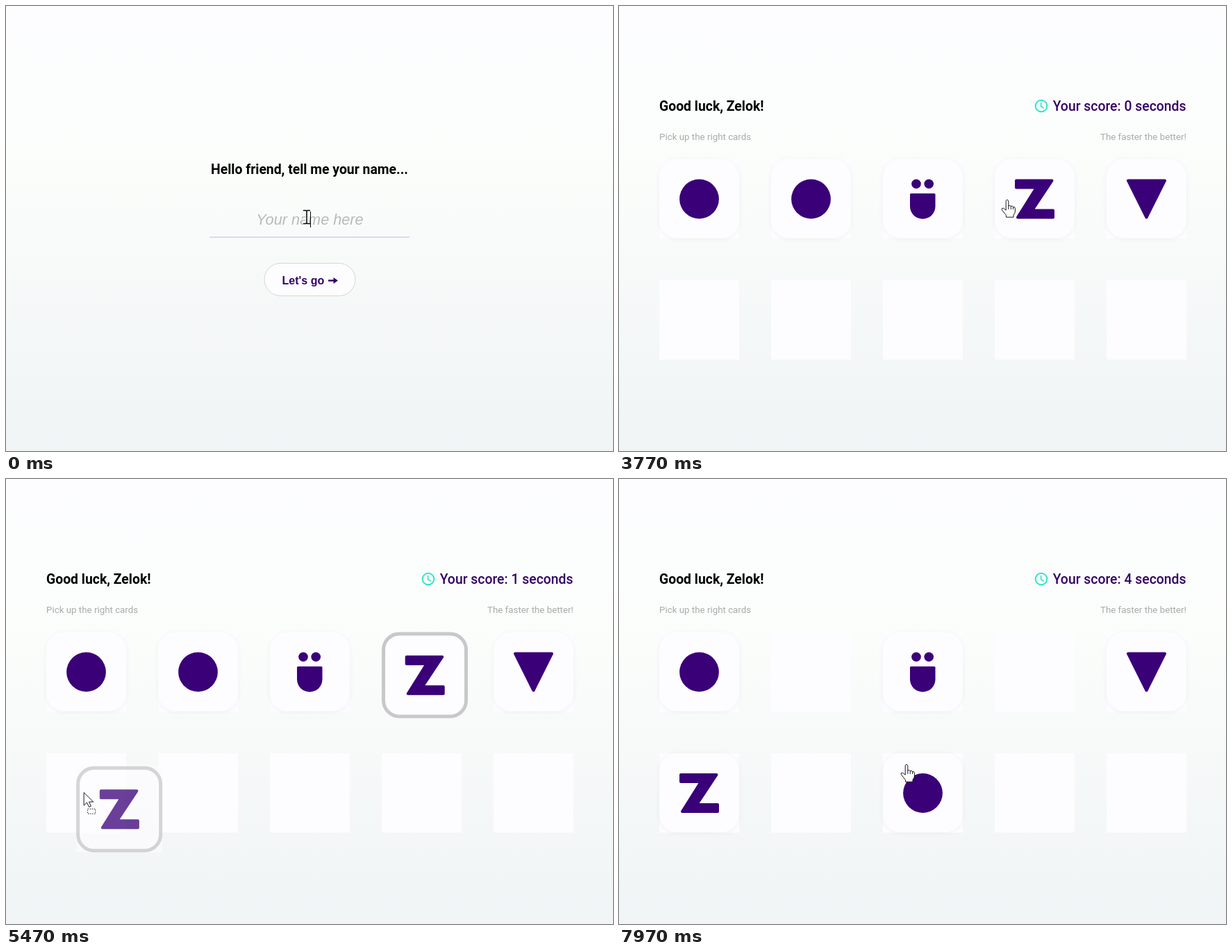
An HTML page that plays this animation: 874 by 641 pixels, repeating every 8 s.

```html
<!DOCTYPE html>
<html lang="en">
<head>
<meta charset="utf-8">
<title>Card game</title>
<style>
  html, body { margin: 0; width: 100%; height: 100%; overflow: hidden; background: #f8fafa; }
  svg { display: block; width: 100%; height: 100%; }
  text { font: 19.36px Roboto, sans-serif; white-space: pre; }
  .bold { font-weight: 700; }
  .medium { font-weight: 500; }
  .small { font-size: 13.33px; fill: #aaa; }
  .field { font: italic 21.7px "Liberation Sans", Arial, sans-serif; }
  .button { font: bold 16px "Liberation Sans", Arial, sans-serif; fill: #330066; }
  .middle { text-anchor: middle; }
  .end { text-anchor: end; }
  .card { filter: drop-shadow(0 1px 3px rgba(30, 20, 60, .05)); }
  .shape { fill: #3a0078; stroke: #3a0078; stroke-width: 0; stroke-linejoin: round; }
  .pointer { fill: #fff; stroke: #000; stroke-width: .9; stroke-linejoin: round; }
</style>
</head>
<body>
<svg viewBox="0 0 874 641">
  <defs>
    <linearGradient id="sky" x2="0" y2="1">
      <stop stop-color="#fdfdff"/>
      <stop offset=".35" stop-color="#fbfdfb"/>
      <stop offset="1" stop-color="#f0f4f5"/>
    </linearGradient>
    <g id="circle" class="shape"><circle cx="57.5" cy="57.5" r="28.4"/></g>
    <g id="smile" class="shape">
      <circle cx="48" cy="35.8" r="6.8"/>
      <circle cx="66.2" cy="35.8" r="6.8"/>
      <path d="M40.5 49.5h33.5q1.5 0 1.5 1.5v17a18.2 18.2 0 0 1-36.5 0v-17q0-1.5 1.5-1.5z"/>
    </g>
    <path id="zed" class="shape" style="stroke-width:4" d="M31 31H82.5L54 74H84V84H33L60 41H31z"/>
    <path id="triangle" class="shape" style="stroke-width:4" d="M31 31H84L57.5 84z"/>
  </defs>

  <rect width="874" height="641" fill="url(#sky)"/>

  <g id="welcome">
    <text class="bold middle" x="437" y="242">Hello friend, tell me your name...</text>
    <text id="field" class="field middle" x="437.5" y="315"></text>
    <path id="caret" d="M0 296V319" stroke="#000"/>
    <path d="M293 333H581" stroke="#cfcfee" stroke-width="1.6"/>
    <rect x="372" y="370.5" width="131" height="47" rx="23.5" fill="#fdfcff" stroke="#d6d6c8"/>
    <text class="button" x="397.5" y="401">Let's go</text>
    <path d="M464 395.5H474" stroke="#330066" stroke-width="2.4"/>
    <path d="M471.5 391L478 395.5L471.5 400z" fill="#330066"/>
  </g>

  <g id="game">
    <text class="bold" x="58" y="151">Good luck, Zelok!</text>
    <text class="small" x="58" y="193">Pick up the right cards</text>
    <g fill="none" stroke="#2ee6cb" stroke-width="2">
      <circle cx="608" cy="144" r="8.3"/>
      <path d="M607.6 139V144.8L611.8 147.3" stroke-width="1.6"/>
    </g>
    <text id="score" class="medium end" x="816.5" y="151" fill="#330066"></text>
    <text class="small end" x="817" y="193">The faster the better!</text>
    <g id="slots" fill="#fdfcff"></g>
    <g id="cards"></g>
    <g id="ghost" opacity=".75"></g>
  </g>

  <g id="cursor">
    <g id="ibeam" fill="none">
      <path d="M-5 -9.5H-1L0 -8.5L1 -9.5H5M0 -8.5V8.5M-5 9.5H-1L0 8.5L1 9.5H5" stroke="#fff" stroke-width="3.2"/>
      <path d="M-5 -9.5H-1L0 -8.5L1 -9.5H5M0 -8.5V8.5M-5 9.5H-1L0 8.5L1 9.5H5" stroke="#000" stroke-width="1.5"/>
    </g>
    <path id="arrow" class="pointer" d="M0 0V18.5L4.4 14.4L7.4 20.8L10.3 19.5L7.4 13.4H13.6z"/>
    <g id="hand" class="pointer">
      <path d="M-1.8 1.5Q0 -1.5 1.8 1.5V9Q3.6 7.4 5.3 9.4Q7.2 8.2 8.5 10.4Q11.4 9.8 11.4 13V17Q11.2 20 9 22V25.2H-1.5V22.5L-7.8 14.6Q-8.4 11.8 -5.6 12.2L-1.8 15.2z"/>
      <path d="M1.8 9V14M5.3 9.6V14M8.5 10.6V14" fill="none"/>
    </g>
    <g id="blocked" fill="none">
      <g stroke="#fff" stroke-width="5"><circle r="10.2"/><path d="M-7 -7L7 7"/></g>
      <g stroke="#000" stroke-width="2.8"><circle r="10.2"/><path d="M-7 -7L7 7"/></g>
    </g>
    <g id="move" class="pointer">
      <path d="M0 0V18.5L4.4 14.4L7.4 20.8L10.3 19.5L7.4 13.4H13.6z"/>
      <rect x="5.5" y="23.5" width="11" height="7" stroke-dasharray="1.5 1.5"/>
    </g>
  </g>
</svg>
<script>
const LOOP = 8000, GAME_START = 2400, FIRST_TICK = 4700;
const NAME = "Zelok", FIRST_KEY = 850, KEY_GAP = 163;
const SIZE = 115;
const $ = id => document.getElementById(id);
const show = (id, on) => $(id).style.display = on ? "" : "none";
const place = (node, [x, y]) => node.setAttribute("transform", `translate(${x} ${y})`);
const slot = i => [58 + 161 * (i % 5), i < 5 ? 220.5 : 395];

// time, x, y
const path = [
  [0, 433, 304], [900, 433, 304], [1300, 520, 231], [1730, 518, 231],
  [2070, 434.5, 346.5], [2250, 432, 392], [2480, 432, 394], [2850, 139, 447],
  [3230, 800, 142], [3430, 806, 212], [3770, 559, 279], [3980, 552, 259],
  [4050, 552, 259], [4270, 494, 338], [5100, 262, 376], [5450, 112, 452],
  [5700, 119, 435], [6030, 123, 431], [6250, 69, 491], [6680, 273, 256],
  [6760, 273, 256], [7100, 346, 337], [7350, 411, 427], [7500, 412, 418],
  [7900, 414, 411], [8000, 414, 411]
];

const cards = [
  { shape: "circle" },
  { shape: "circle", grab: 6760, drop: 7480, target: 7, hold: [54, 35] },
  { shape: "smile" },
  { shape: "zed", grab: 4050, drop: 5720, target: 5, hold: [11, 38] },
  { shape: "triangle" }
];

const plainCard = shape =>
  `<rect class="card" width="${SIZE}" height="${SIZE - 1}" rx="26" fill="#fdfcff"/><use href="#${shape}"/>`;
const heldCard = shape =>
  `<rect x="2.5" y="2.5" width="119" height="119" rx="23" fill="#fdfcff" stroke="#c8c8ca" stroke-width="5"/>
   <use href="#${shape}" x="4.7" y="4.7"/>`;

$("slots").innerHTML = Array.from({ length: 10 }, (_, i) => {
  const [x, y] = slot(i);
  return `<rect x="${x}" y="${y}" width="${SIZE}" height="${SIZE - 0.5}"/>`;
}).join("");
$("cards").innerHTML = cards.map(() => "<g></g>").join("");

function setContent(node, html) {
  if (node.content !== html) node.innerHTML = node.content = html;
}

function pointerAt(t) {
  const next = Math.max(1, path.findIndex(p => p[0] > t));
  const [t0, x0, y0] = path[next - 1], [t1, x1, y1] = path[next];
  const k = (t - t0) / (t1 - t0), ease = k * k * (3 - 2 * k);
  return [x0 + (x1 - x0) * ease, y0 + (y1 - y0) * ease];
}

const inside = ([px, py], x, y, w, h) => px >= x && px <= x + w && py >= y && py <= y + h;
const inSlot = (p, i) => inside(p, ...slot(i), SIZE, SIZE);

function cursorKind(p, t, held, seats) {
  if (t < GAME_START) {
    if (inside(p, 293, 285, 288, 48) || inside(p, 295, 222, 284, 26)) return "ibeam";
    return inside(p, 372, 370, 131, 48) ? "hand" : "arrow";
  }
  if (held) return [5, 6, 7, 8, 9].some(i => inSlot(p, i)) ? "move" : "blocked";
  if (seats.some(i => inSlot(p, i))) return "hand";
  const overText = inside(p, 58, 132, 153, 24) || inside(p, 625, 132, 192, 24);
  return overText ? "ibeam" : "arrow";
}

function drawWelcome(t) {
  const typed = Math.max(0, Math.min(NAME.length, Math.floor((t - FIRST_KEY) / KEY_GAP) + 1));
  const field = $("field");
  field.textContent = typed ? NAME.slice(0, typed) : "Your name here";
  field.setAttribute("fill", typed ? "#000" : "#b9b9bd");
  const lastKey = typed ? FIRST_KEY + (typed - 1) * KEY_GAP : 0;
  const x = typed ? 439 + field.getComputedTextLength() / 2 : 438.5;
  place($("caret"), [Math.floor(x) + 0.5, 0]);
  show("caret", (t - lastKey) % 1000 < 500);
}

function drawGame(t, pointer, held, seats) {
  const seconds = Math.max(0, Math.floor((t - FIRST_TICK) / 1000) + 1);
  $("score").textContent = `Your score: ${seconds} seconds`;
  cards.forEach((card, i) => {
    const node = $("cards").children[i];
    place(node, slot(seats[i]));
    setContent(node, card === held ? heldCard(card.shape) : plainCard(card.shape));
  });
  show("ghost", held);
  if (held) {
    setContent($("ghost"), `<rect width="124" height="124" fill="#fbfcfc"/>` + heldCard(held.shape));
    place($("ghost"), [pointer[0] - held.hold[0], pointer[1] - held.hold[1]]);
  }
}

function draw(now) {
  const t = now % LOOP, playing = t >= GAME_START;
  const pointer = pointerAt(t);
  const held = cards.find(c => t >= c.grab && t < c.drop);
  const seats = cards.map((c, i) => t >= c.drop ? c.target : i);
  show("welcome", !playing);
  show("game", playing);
  if (playing) drawGame(t, pointer, held, seats);
  else drawWelcome(t);
  const kind = cursorKind(pointer, t, held, seats);
  for (const id of ["ibeam", "arrow", "hand", "blocked", "move"]) show(id, id === kind);
  place($("cursor"), pointer);
}

function tick() {
  draw(performance.now());
  requestAnimationFrame(tick);
}
tick();
</script>
</body>
</html>
```
